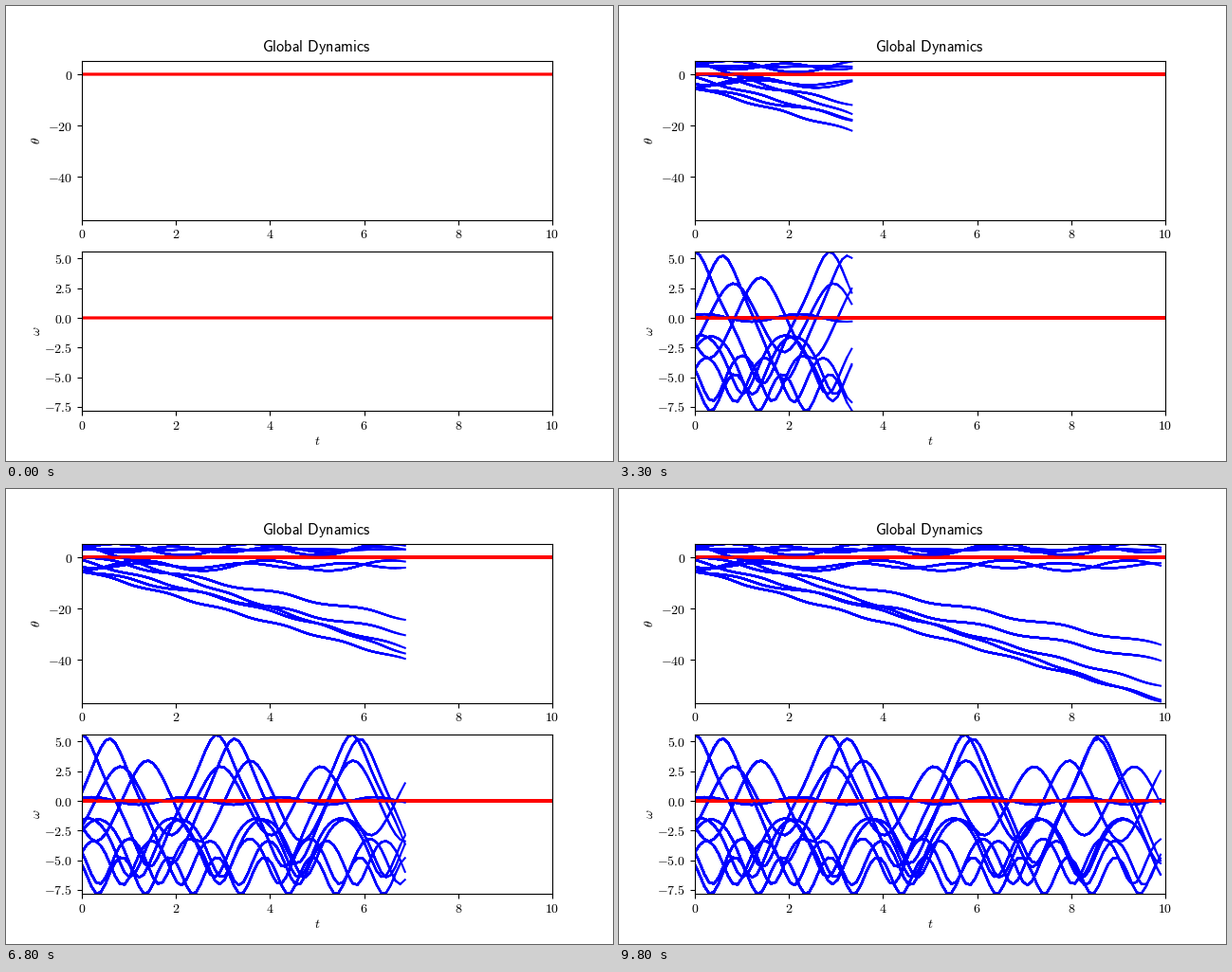
A matplotlib script that plays this animation: 640 px wide and 480 px high, repeating every 9900 ms.

```python
import numpy as np
import matplotlib.pyplot as plt
from matplotlib.animation import FuncAnimation
from matplotlib.collections import LineCollection

plt.rcParams["mathtext.fontset"] = "cm"

WIDTH, HEIGHT, DPI = 640, 480, 100
FRAMES, INTERVAL = 99, 100
GRAVITY = 9.8
SAMPLES, SUBSTEPS = 100, 20
times = np.linspace(0, 10, SAMPLES)

# Each pendulum: a moment, its angle there in units of pi, its speed there.
PENDULUMS = np.array([
    (0.00, 1, 5.582),
    (0.585, -1, 5.255),
    (0.82, -1, 2.90),
    (1.395, 1, 3.40),
    (0.20, 1, 0.32),
    (0.34, 1, -7.857),
    (1.009, -2, -3.185),
    (0.245, -2, -3.37),
    (0.13, 0, -1.48),
    (0.35, -2, -1.568),
])


def slope(state):
    theta, omega = state
    return np.array([omega, GRAVITY * np.sin(theta)])


def advance(state, h, steps):
    """Runge-Kutta steps; h may differ per pendulum."""
    for _ in range(steps):
        a = slope(state)
        b = slope(state + h / 2 * a)
        c = slope(state + h / 2 * b)
        d = slope(state + h * c)
        state = state + h / 6 * (a + 2 * b + 2 * c + d)
    return state


def solve():
    moment, turn, speed = PENDULUMS.T
    state = advance(np.array([turn * np.pi, speed]), -moment / 200, 200)
    states = [state]
    for _ in range(SAMPLES - 1):
        state = advance(state, times[1] / SUBSTEPS, SUBSTEPS)
        states.append(state)
    return np.array(states).transpose(1, 2, 0)


def make_curves(values):
    return [np.column_stack([times, row]) for row in values]


def pixel_text(x, y, text, **style):
    fig.text(x / WIDTH, 1 - y / HEIGHT, text, ha="center", va="center",
             fontsize=10, **style)


def style_axes(ax, limits, ticks, label):
    ax.set_xlim(0, 10)
    ax.set_ylim(*limits)
    ax.set_xticks(range(0, 11, 2), [f"${v}$" for v in range(0, 11, 2)])
    ax.set_yticks(ticks, [label.format(v) for v in ticks])
    ax.tick_params(axis="x", pad=2.8)


fig, (top, bottom) = plt.subplots(
    2, 1, figsize=(WIDTH / DPI, HEIGHT / DPI), dpi=DPI)
style_axes(top, (-56.74, 5.45), [-40, -20, 0], "${:d}$")
style_axes(bottom, (-7.845, 5.58), np.arange(-7.5, 5.1, 2.5), "${:.1f}$")
top.set_title(r"$\mathsf{Global\ Dynamics}$", fontsize=11.7, x=0.4978, pad=6.7)
pixel_text(32.3, 141.6, r"$\theta$", rotation=90)
pixel_text(31.5, 343.2, r"$\omega$", rotation=90)
pixel_text(328, 459.2, "$t$")

axis_line = np.array([(0, 0), (10, 0)])
theta, omega = solve()
layers = []
for ax, values in ((top, theta), (bottom, omega)):
    lines = LineCollection([], linewidths=1.5, capstyle="projecting",
                           joinstyle="round", zorder=2)
    ax.add_collection(lines, autolim=False)
    layers.append((lines, make_curves(values)))


def passes(k):
    """Strokes pile up over time; older ones are thinned out."""
    recent = max(0, k - 12)
    return [0, *range(0, recent, 4), *range(recent, k + 1)]


def update(k):
    for lines, curves in layers:
        segments, colors = [], []
        for last in passes(k):
            for curve in curves:
                if last:
                    segments.append(curve[:last + 1])
                    colors.append("blue")
                segments.append(axis_line)
                colors.append("red")
        lines.set_segments(segments)
        lines.set_color(colors)
    return [lines for lines, _ in layers]


anim = FuncAnimation(fig, update, frames=FRAMES, interval=INTERVAL,
                     repeat=True, repeat_delay=0, blit=False)
plt.show()
```
